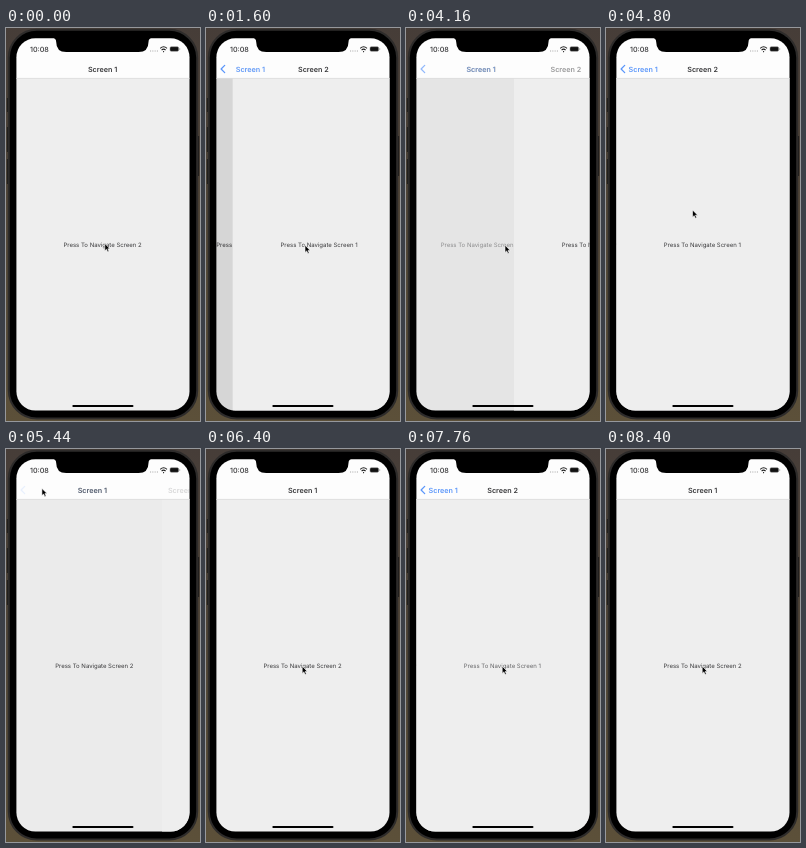
An HTML page that plays this animation: 194x393 px, repeating every 8720 ms.

```html
<!DOCTYPE html>
<html lang="en">
<head>
<meta charset="utf-8">
<title>Stack navigation</title>
<style>
  html, body { margin: 0; width: 100%; height: 100%; overflow: hidden; background: #51483d; }
  svg { display: block; width: 100vw; height: 100vh; }
  text { font-family: Inter, "Liberation Sans", sans-serif; fill: #38383a; text-anchor: middle; text-rendering: geometricPrecision; }
  .title { font-size: 7.2px; font-weight: 600; }
  .clock { font-size: 7.2px; font-weight: 500; }
  .body { font-size: 6px; }
  .blue { fill: #5c97fa; }
</style>
</head>
<body>
<svg viewBox="0 0 194 393">
  <defs>
    <clipPath id="display"><rect x="10.4" y="10.3" width="173.1" height="372.3" rx="19"/></clipPath>
    <linearGradient id="back" x2="0" y2="1">
      <stop offset="0" stop-color="#463d38"/>
      <stop offset="1" stop-color="#5c5039"/>
    </linearGradient>
  </defs>

  <rect width="194" height="393" fill="url(#back)"/>
  <path d="M1.6 70v14M1.6 99v25M1.6 131v25M192.4 108v40" stroke="#1f1d1c" stroke-width="1.4"/>
  <rect x="2.8" y="1.8" width="188.4" height="388.6" rx="28" fill="#000" stroke="#2e2c2b" stroke-width="2"/>

  <g clip-path="url(#display)">
    <g id="first">
      <rect x="10" y="50" width="250" height="333" fill="#eeeeee"/>
      <text id="label1" class="body" x="96.6" y="218.6">Press To Navigate Screen 2</text>
    </g>
    <rect id="dim" x="10" y="50" width="174" height="333"/>
    <g id="second">
      <rect x="10" y="50" width="174" height="333" fill="#eeeeee"/>
      <text id="label2" class="body" x="96.4" y="218.6">Press To Navigate Screen 1</text>
    </g>

    <rect x="10" y="10" width="174" height="40.4" fill="#fdfdfd"/>
    <path d="M10 50.4h174" stroke="#d2d2d2" stroke-width=".6"/>
    <path id="chevron" d="M18.7 37.4l-3.6 3.6 3.6 3.6" fill="none" stroke="#5c97fa" stroke-width="1.3" stroke-linecap="round" stroke-linejoin="round"/>
    <text id="title1" class="title" y="43.5">Screen 1</text>
    <text id="back1" class="title blue" y="43.5">Screen 1</text>
    <text id="title2" class="title" y="43.5">Screen 2</text>

    <text x="33.4" y="23.6" class="clock">10:08</text>
    <path d="M144 23h8" stroke="#aaa" stroke-width="1" stroke-dasharray="1.1 1.2"/>
    <g fill="none" stroke="#222" stroke-width="1.1">
      <path d="M154.2 20.3q3.4-3 6.8 0M155.6 22q2-1.7 4 0"/>
      <path d="M157.1 23.6h1" stroke-width="1.2"/>
    </g>
    <rect x="164" y="18.7" width="8.6" height="4.6" rx="1.3" fill="#111" stroke="#888" stroke-width=".5"/>
    <path d="M173.7 20.3v1.5" stroke="#888" stroke-width=".7"/>
    <rect x="66.3" y="377" width="61.2" height="2.1" rx="1" fill="#000"/>
  </g>
  <path d="M46 9.5q4.2.6 4.2 4.5 0 10 10 10h72.3q10 0 10-10 0-3.9 4.2-4.5z"/>
  <path id="cursor" d="M0 0v7.2l1.7-1.5 1.2 2.6 1.3-.6-1.2-2.5h2.2z" fill="#000" stroke="#fff" stroke-width=".6"/>
</svg>
<script>
const LOOP = 8720, STEP = 80, SETTLE = 560, MID = 96.6;
const el = id => document.getElementById(id);
const clamp = v => Math.max(0, Math.min(1, v));
const ramp = (t, a, b) => clamp((t - a) / (b - a));
const smooth = u => u * u * (3 - 2 * u);

// start time and destination (1 = second screen)
const moves = [[1403, 1], [3120, 0], [4086, 1], [5275, 0], [6805, 1], [7840, 0]];
// touch feedback: label, press, held, released, recovered, lowest opacity
const touches = [
  ["label2", 2960, 3120, 3200, 3520, .25],
  ["label1", 3840, 4080, 4160, 4480, .5],
  ["label2", 7680, 7840, 7920, 8240, .5]
];
// time, x, y
const track = [
  [0, 98.8, 215.6], [880, 99, 217.2], [4640, 99, 217.2],
  [5200, 35.9, 39.4], [5520, 35.9, 39.4], [6400, 96.2, 217.2], [LOOP, 96.2, 217.2]
];

function spring(ms) {
  if (ms >= SETTLE) return 1;
  const u = ms / 50;
  return 1 - (1 + u) * Math.exp(-u);
}

function progress(t) {
  const move = moves.filter(m => m[0] <= t).pop();
  if (!move) return { p: 0, push: true };
  const s = spring(t - move[0]);
  return { p: move[1] ? s : 1 - s, push: !!move[1] };
}

function labelOpacity(id, t) {
  return touches.reduce((o, [name, a, b, c, d, low]) =>
    name === id ? o - (1 - low) * (ramp(t, a, b) - ramp(t, c, d)) : o, 1);
}

function cursorAt(t) {
  const i = track.findIndex(k => k[0] > t);
  const [t0, x0, y0] = track[i - 1], [t1, x1, y1] = track[i];
  const u = smooth(ramp(t, t0, t1));
  return [x0 + (x1 - x0) * u, y0 + (y1 - y0) * u];
}

const shift = (id, x, y = 0) => el(id).setAttribute("transform", `translate(${x} ${y})`);
const fade = (id, o) => el(id).setAttribute("opacity", clamp(o));

function draw(t) {
  const { p, push } = progress(t), q = 1 - p;
  shift("first", -52.2 * p);
  shift("second", 173.6 * q);
  fade("dim", .115 * p ** 1.3);
  fade("label1", labelOpacity("label1", t));
  fade("label2", labelOpacity("label2", t));

  const left = push ? 42 * p + 17 * p * p : 66 * p - 7 * p * p;
  const right = push ? 112 * q : 69 * q + 32 * q * q;
  shift("title1", MID - left);
  shift("back1", MID - left - .4 * p);
  shift("title2", MID + right);
  fade("title1", 1 - p * 1.05);
  fade("back1", p * 1.05);
  fade("title2", p * 1.15);
  fade("chevron", smooth(clamp(p * 1.4)));

  shift("cursor", ...cursorAt(t));
}

function frame(now) {
  draw(Math.floor((now % LOOP) / STEP) * STEP);
  requestAnimationFrame(frame);
}
draw(0);
requestAnimationFrame(frame);
</script>
</body>
</html>
```
